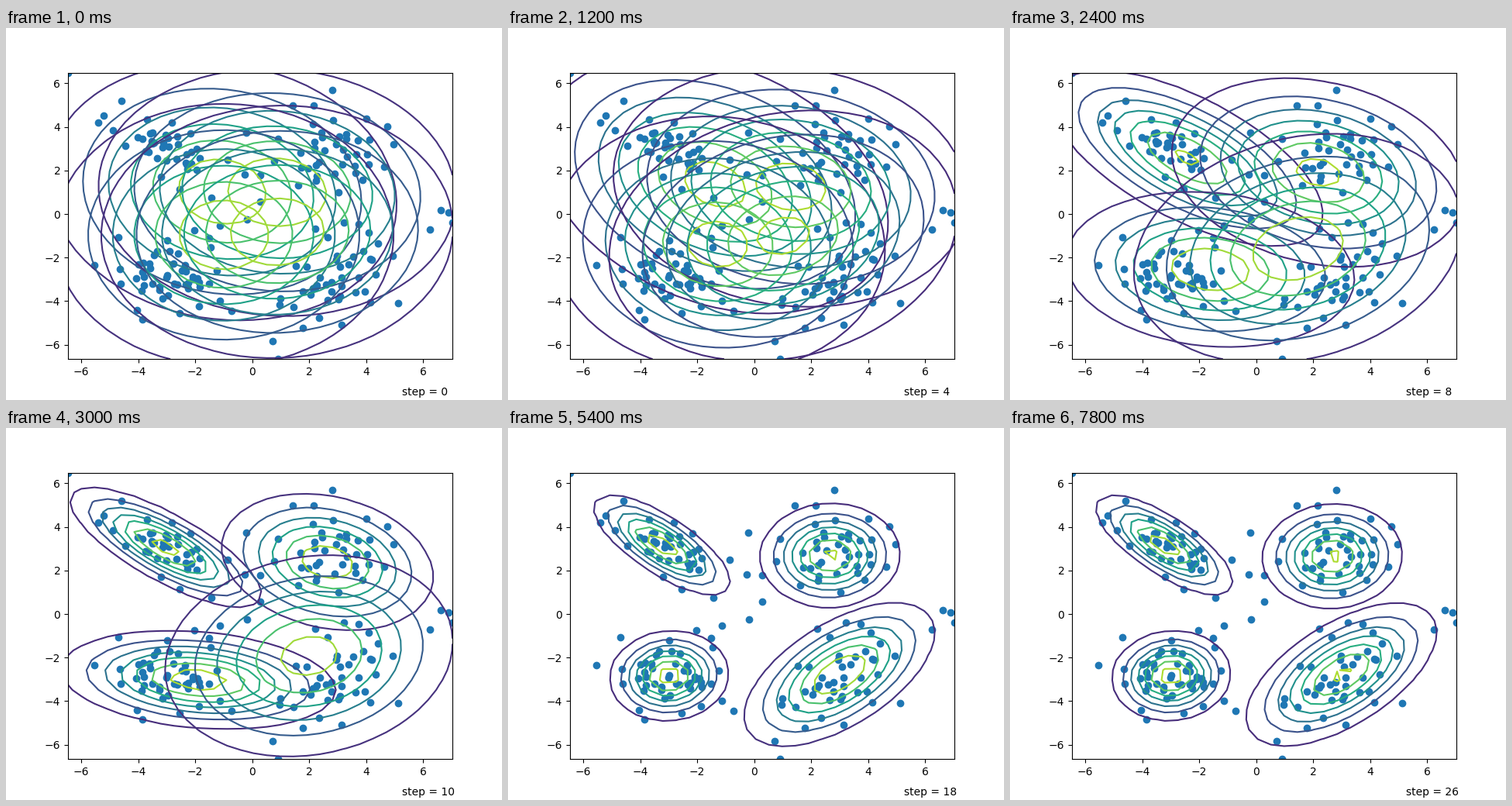
Write a matplotlib script that moves like this. It is 640 px wide and 480 px high and loops after 8100 ms.

```python
import numpy as np
import matplotlib.pyplot as plt
from matplotlib.animation import FuncAnimation

STEPS, INTERVAL = 27, 300
X_LIM, Y_LIM = (-6.463, 7.034), (-6.657, 6.487)

# Fitted components at a few steps: mean x, mean y, sigma x, sigma y, correlation
KEY_STEPS = np.array([0, 4, 6, 10, 14, 18, 26])
UPPER_LEFT = [
    (-1.05, 1.03, 3.127, 3.02, -0.10),
    (-1.37, 1.36, 3.03, 2.95, -0.30),
    (-1.68, 1.86, 2.98, 2.73, -0.43),
    (-3.034, 3.058, 1.67, 1.366, -0.782),
    (-3.298, 3.218, 1.16, 1.083, -0.72),
    (-3.235, 3.165, 1.222, 1.165, -0.75),
    (-3.224, 3.165, 1.225, 1.165, -0.75),
]
UPPER_RIGHT = [
    (0.884, 1.0, 3.18, 2.88, -0.05),
    (1.29, 1.25, 3.09, 2.73, -0.10),
    (1.565, 1.42, 3.06, 2.65, -0.20),
    (2.646, 2.383, 1.893, 1.597, -0.22),
    (2.70, 2.711, 1.215, 1.188, 0.0),
    (2.667, 2.685, 1.225, 1.195, 0.02),
    (2.68, 2.65, 1.223, 1.197, 0.03),
]
LOWER_LEFT = [
    (-0.99, -0.96, 3.03, 3.06, 0.0),
    (-1.27, -1.39, 2.92, 2.92, -0.05),
    (-1.40, -1.81, 2.72, 2.658, -0.05),
    (-1.89, -3.02, 2.39, 1.112, -0.21),
    (-2.653, -2.952, 1.587, 1.046, -0.22),
    (-2.982, -2.838, 1.028, 1.022, 0.05),
    (-2.98, -2.836, 1.025, 1.02, 0.05),
]
LOWER_RIGHT = [
    (0.884, -0.82, 3.14, 2.945, 0.03),
    (1.02, -1.0, 3.06, 2.88, 0.17),
    (1.10, -1.25, 3.08, 2.85, 0.28),
    (2.0, -1.92, 2.61, 2.385, 0.14),
    (2.925, -2.418, 1.84, 1.815, 0.33),
    (2.993, -2.774, 1.69, 1.665, 0.59),
    (2.993, -2.774, 1.679, 1.648, 0.598),
]

# Sparse outer samples, in stage pixels
OUTER = [
    (80, 58), (421, 80), (370, 100), (397, 100), (465, 117), (492, 127),
    (500, 150), (422, 119), (396, 124), (407, 135), (430, 140), (351, 143),
    (310, 135), (346, 172), (286, 170), (308, 189), (328, 190), (328, 224),
    (311, 247), (265, 219), (224, 208), (200, 192), (561, 235), (571, 238),
    (576, 251), (547, 260), (506, 355), (433, 383), (344, 404), (351, 427),
    (383, 387), (470, 354), (404, 374), (499, 294), (468, 264), (455, 253),
    (436, 251), (415, 270), (399, 259), (480, 278), (477, 318), (463, 340),
    (291, 365), (276, 352), (243, 261), (276, 255), (262, 271), (264, 283),
    (272, 313), (262, 330), (249, 359), (224, 368), (114, 306), (145, 270),
    (208, 274), (176, 376), (169, 364), (148, 330), (147, 311), (119, 122),
    (126, 113), (149, 94), (138, 132), (154, 152), (182, 118), (214, 122),
    (238, 136), (246, 183), (488, 179), (460, 196), (429, 212), (377, 203),
    (469, 144), (448, 295),
]

# Dense cores: centre x, centre y, half width, half height, correlation, count
CORES = [
    (-2.95, 3.05, 1.2, 1.0, -0.6, 27),
    (2.9, 2.55, 1.25, 1.3, 0.0, 24),
    (-2.9, -2.8, 1.25, 1.2, 0.0, 34),
    (2.5, -3.05, 1.95, 1.5, 0.5, 28),
]


def to_data(pixels):
    px, py = np.array(pixels, float).T
    return (px - 317.5) / 36.75, (240 - py) / 28.12


def core_samples(rng, cx, cy, w, h, rho, count):
    radius = np.sqrt(rng.random(count))
    angle = rng.random(count) * 2 * np.pi
    u, v = radius * np.cos(angle), radius * np.sin(angle)
    return cx + w * u, cy + h * (rho * u + np.sqrt(1 - rho**2) * v)


def smooth(rows):
    """Monotone cubic path through the key steps, settling at the end."""
    rows = np.array(rows)
    gap = np.diff(KEY_STEPS)[:, None]
    rate = np.diff(rows, axis=0) / gap
    slope = np.zeros_like(rows)
    slope[0] = rate[0]
    a, b = rate[:-1], rate[1:]
    same = a * b > 0
    slope[1:-1][same] = 2 * a[same] * b[same] / (a + b)[same]

    steps = np.arange(STEPS)
    i = np.clip(np.searchsorted(KEY_STEPS, steps, "right") - 1, 0, len(gap) - 1)
    h = gap[i]
    t = (steps - KEY_STEPS[i])[:, None] / h
    return ((1 + 2 * t) * (1 - t)**2 * rows[i] + t * (1 - t)**2 * h * slope[i]
            + t**2 * (3 - 2 * t) * rows[i + 1] - t**2 * (1 - t) * h * slope[i + 1])


def density(mx, my, sx, sy, rho):
    u, v = (gx - mx) / sx, (gy - my) / sy
    rest = 1 - rho**2
    peak = 1 / (2 * np.pi * sx * sy * np.sqrt(rest))
    return peak * np.exp(-(u * u + v * v - 2 * rho * u * v) / (2 * rest))


paths = [smooth(rows) for rows in
         (UPPER_LEFT, UPPER_RIGHT, LOWER_LEFT, LOWER_RIGHT)]
gx, gy = np.meshgrid(np.linspace(*X_LIM, 30), np.linspace(*Y_LIM, 30))

rng = np.random.default_rng(7)
groups = [to_data(OUTER)] + [core_samples(rng, *core) for core in CORES]
xs, ys = (np.concatenate(part) for part in zip(*groups))

fig, ax = plt.subplots(figsize=(6.4, 4.8), dpi=100)
ax.scatter(xs, ys, color="C0")
ax.set(xlim=X_LIM, ylim=Y_LIM)
ax.autoscale(False)
label = fig.text(510.8 / 640, 6 / 480, "", fontsize=10)
contours = []


def update(step):
    while contours:
        contours.pop().remove()
    for path in paths:
        contours.append(ax.contour(gx, gy, density(*path[step])))
    label.set_text(f"step = {step}")
    return [*contours, label]


anim = FuncAnimation(fig, update, frames=STEPS, interval=INTERVAL,
                     init_func=lambda: [], repeat=True, repeat_delay=0)
plt.show()
```
